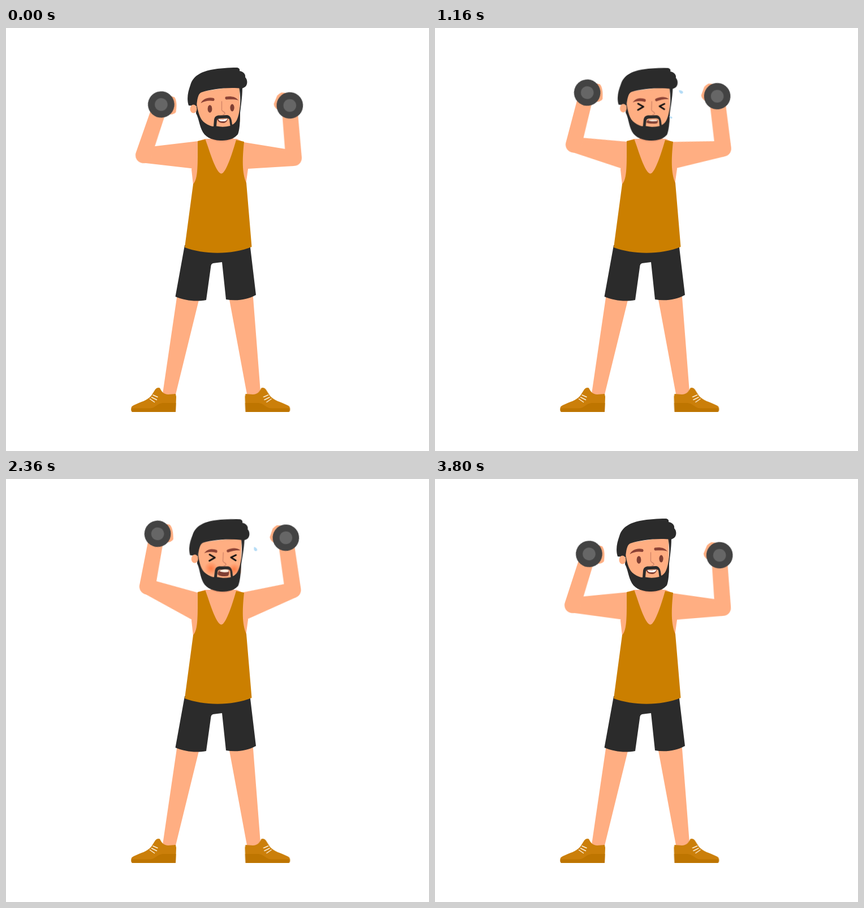
An HTML page for the animation above (3.84 s loop, 748 px wide and 748 px high).

```html
<!DOCTYPE html>
<html lang="en">
<head>
<meta charset="utf-8">
<title>Dumbbell press</title>
<style>
html, body { margin: 0; width: 100%; height: 100%; overflow: hidden; background: #fff; }
svg { display: block; width: 100vw; height: 100vh; }
.skin { fill: #ffae82; }
.dark { fill: #2b2b2b; }
.shirt { fill: #cb7f00; }
.shoe { fill: #cb7f0a; }
.sole { fill: #be7500; }
.brown { fill: #7f3f33; }
.brow { fill: #8b4235; }
.drop { fill: #b5dcf6; }
.line { fill: none; stroke-linecap: round; stroke-linejoin: round; }
.squint { stroke: #111; stroke-width: 2.9; }
.nose { stroke: #cf8266; stroke-width: 1.3; }
.lace { stroke: #fff3e0; stroke-width: 1.5; }

.a { animation: 3840ms linear infinite; }
.upper-l { animation-name: upper-l; }
.fore-l { animation-name: fore-l; }
.hand-l { animation-name: hand-l; }
.upper-r { animation-name: upper-r; }
.fore-r { animation-name: fore-r; }
.hand-r { animation-name: hand-r; }
.head { animation-name: head; }
.calm { animation-name: calm; }
.effort { animation-name: effort; }
.mouth { animation-name: mouth; }
.blush { animation-name: blush; }
.d1 { animation-name: d1; }
.d2 { animation-name: d2; }
.d3 { animation-name: d3; }
.d4 { animation-name: d4; }

/* slow press, quick push, hold, drop */
@keyframes upper-l {
  0% { transform: rotate(0deg); }
  19.79% { transform: rotate(6.8deg); }
  30.21% { transform: rotate(11.8deg); }
  45.83% { transform: rotate(18deg); }
  62% { transform: rotate(22.4deg); animation-timing-function: ease-in-out; }
  74.5%, 89.58% { transform: rotate(35.2deg); animation-timing-function: cubic-bezier(.42, 0, .71, 1); }
  100% { transform: rotate(0deg); }
}
@keyframes fore-l {
  0% { transform: rotate(19.3deg); }
  19.79% { transform: rotate(9.5deg); }
  30.21% { transform: rotate(3deg); }
  45.83% { transform: rotate(-4.4deg); }
  62% { transform: rotate(-11.4deg); animation-timing-function: ease-in-out; }
  74.5%, 89.58% { transform: rotate(-42deg); animation-timing-function: cubic-bezier(.42, 0, .74, 1); }
  100% { transform: rotate(19.3deg); }
}
@keyframes hand-l {
  0%, 62% { transform: translateY(0); animation-timing-function: ease-in-out; }
  74.5%, 89.58% { transform: translateY(-6.6px); animation-timing-function: ease-in-out; }
  100% { transform: translateY(0); }
}
@keyframes upper-r {
  0% { transform: rotate(0deg); }
  19.79% { transform: rotate(-5.3deg); }
  30.21% { transform: rotate(-10.2deg); }
  45.83% { transform: rotate(-17.2deg); }
  62% { transform: rotate(-20.8deg); animation-timing-function: ease-in-out; }
  74.5%, 89.58% { transform: rotate(-35deg); animation-timing-function: cubic-bezier(.42, 0, .71, 1); }
  100% { transform: rotate(0deg); }
}
@keyframes fore-r {
  0% { transform: rotate(-4.4deg); }
  19.79% { transform: rotate(-.1deg); }
  30.21% { transform: rotate(3.6deg); }
  45.83% { transform: rotate(8.8deg); }
  62% { transform: rotate(13deg); animation-timing-function: ease-in-out; }
  74.5%, 89.58% { transform: rotate(41.9deg); animation-timing-function: cubic-bezier(.42, 0, .74, 1); }
  100% { transform: rotate(-4.4deg); }
}
@keyframes hand-r {
  0%, 62% { transform: translateY(0); animation-timing-function: ease-in-out; }
  74.5%, 89.58% { transform: translateY(-2.5px); animation-timing-function: ease-in-out; }
  100% { transform: translateY(0); }
}
@keyframes head {
  0%, 7% { transform: rotate(0deg); }
  11%, 19.79% { transform: rotate(1.2deg); }
  30.21% { transform: rotate(1.5deg); }
  45.83% { transform: rotate(2.7deg); }
  61.46%, 72% { transform: rotate(2.3deg); }
  74%, 100% { transform: rotate(0deg); }
}
@keyframes calm {
  0%, 10.41% { opacity: 1; }
  10.42%, 73.95% { opacity: 0; }
  73.96%, 100% { opacity: 1; }
}
@keyframes effort {
  0%, 10.41% { opacity: 0; }
  10.42%, 73.95% { opacity: 1; }
  73.96%, 100% { opacity: 0; }
}
@keyframes mouth {
  0%, 20% { transform: scaleY(.12); }
  30.21% { transform: scaleY(.6); }
  42%, 100% { transform: scaleY(1); }
}
@keyframes blush {
  0%, 31% { opacity: 0; }
  44%, 73.95% { opacity: 1; }
  73.96%, 100% { opacity: 0; }
}
@keyframes d1 {
  0%, 27% { transform: translate(427px, 109px) scale(.3); opacity: 0; }
  28% { opacity: 1; }
  30.21% { transform: translate(435px, 113px); opacity: 1; }
  36%, 100% { transform: translate(450px, 124px); opacity: 0; }
}
@keyframes d2 {
  0%, 28.5% { transform: translate(413px, 156px) scale(.3); opacity: 0; }
  30.21% { transform: translate(417px, 158px) scale(.7); opacity: 1; }
  37%, 100% { transform: translate(433px, 167px); opacity: 0; }
}
@keyframes d3 {
  0%, 44.8% { transform: translate(344px, 107px) scale(.3); opacity: 0; }
  45.83% { transform: translate(341px, 106px) scale(.7); opacity: .65; }
  48% { opacity: 1; }
  53%, 100% { transform: translate(314px, 98px); opacity: 0; }
}
@keyframes d4 {
  0%, 57.5% { transform: translate(425px, 113px) scale(.3); opacity: 0; }
  59% { opacity: 1; }
  61.46% { transform: translate(441px, 124px) rotate(25deg); opacity: 1; }
  67%, 100% { transform: translate(455px, 138px) rotate(30deg); opacity: 0; }
}
</style>
</head>
<body>
<svg viewBox="0 0 748 748">
  <defs>
    <radialGradient id="glow">
      <stop offset="0" stop-color="#ff6a30" stop-opacity=".75"/>
      <stop offset="1" stop-color="#ff6a30" stop-opacity="0"/>
    </radialGradient>
    <g id="weight">
      <circle r="23.4" fill="#434343"/>
      <circle r="11.3" fill="#666"/>
    </g>
    <g id="shoe">
      <path class="shoe" d="M221.500 673Q221 669 226 667C238 661 250 659 257 650L264 639Q267 635 272 636.500C275 643 279 648 287 648L300 647L301 652L300 679H224Q221 679 221.500 673Z"/>
      <path class="sole" d="M221.500 672.500H255C264 672 267 664 277 663H300.500L300 679H224Q221 679 221.500 672.500Z"/>
      <path class="line lace" d="M260 649L268 652.500M257.500 653L266.500 657.500M254.500 656L262.500 661.500"/>
    </g>
    <path id="drop" class="drop" d="M-4 -2.500C-1 -3.500 4 -2 3.600 1C3 4 -1.500 3.500 -2.500 1Z"/>
  </defs>

  <!-- arms -->
  <g transform="translate(335 225)">
    <g class="a upper-l">
      <path class="skin" d="M5 -25L-92 -13.500L-94 13.300L13 25.500Z"/>
      <g transform="translate(-92 0)">
        <g class="a fore-l">
          <circle class="skin" r="14"/>
          <path class="skin" d="M-14 0L-14 -92H12.300L14.300 0Z"/>
          <g class="a hand-l">
            <g transform="translate(0 -95)">
              <path class="skin" d="M6 -20L18 -20C24 -16 27 -6 29 4Q28 8 22 11L8 14Z"/>
              <use href="#weight"/>
            </g>
          </g>
        </g>
      </g>
    </g>
  </g>
  <g transform="translate(416 217)">
    <g class="a upper-r">
      <path class="skin" d="M-6 -16.800L92 -.7L93 27L-6 33Z"/>
      <g transform="translate(93 13)">
        <g class="a fore-r">
          <circle class="skin" r="14"/>
          <path class="skin" d="M-14.500 0V-92H13L14 0Z"/>
          <g class="a hand-r">
            <g transform="translate(0 -93.300)">
              <path class="skin" d="M-6 -23L-13 -24Q-18 -22 -21 -19L-28 -5Q-28 1 -23 5L-8 8Z"/>
              <use href="#weight"/>
            </g>
          </g>
        </g>
      </g>
    </g>
  </g>

  <!-- body -->
  <path class="skin" d="M339 200L352 196H408L421 202L428 249L424 278H331L328 250Z"/>
  <path fill="#f7a279" d="M361 195C370 204 393 204 403 195Z"/>
  <path class="skin" d="M303 470L276.500 650H299.500L342.500 475ZM394 475L426.500 650H450.500L436.500 470Z"/>
  <path class="dark" d="M316 384L299.500 475C316 482 336 484.500 354 481L362.500 420Q363 417 366 416L382 414L389 480C407 483 426 481 442 472L431.500 384Z"/>
  <path class="shirt" d="M339 200L352.500 197C359 214 371 257 381 257.500C389 257 401 219 407 198L421 201C418 230 417 256 425 274L434.500 387C400 401 350 401 316 388L331 276C340 267 339 240 339 200Z"/>
  <use href="#shoe"/>
  <use href="#shoe" transform="matrix(-1 0 0 1 723.500 0)"/>

  <!-- head -->
  <g transform="translate(380 198)">
    <g class="a head">
      <g transform="translate(-380 -198)">
        <path class="skin" d="M337 114L413 102L414 165L400 186H355L337 152Z"/>
        <g class="a blush" fill="url(#glow)">
          <circle cx="361" cy="159" r="12"/>
          <circle cx="402" cy="159" r="11"/>
        </g>
        <path class="dark" fill-rule="evenodd" d="M412 104L418 106C418 122 415 140 414 150C414 166 413 181 410 188C402 198 388 199 379 199C362 198 351 192 346 180C341 168 341 160 336 151L337 134C340 150 343 162 352 168C358 172 363 174 367 174L368 162C369 156 373 154 379 154.500L391 154C397 155 399 160 400 171C407 168 410 160 412 150C415 135 415 120 412 104ZM372 173.500L373 163Q374 160 380 160L390 159.500Q394 159.500 395 162L396.500 173Q384 176 372 173.500Z"/>
        <path class="dark" d="M323 137C319 125 322 112 326 101C331 84 345 78 362 74C378 71 395 70 407 70C412 70 414 73 413 76C420 77 424 82 423 87C428 92 427 101 423 104Q420 106 417 107C395 104 362 108 345 114C339 117 338 128 337 138Z"/>
        <ellipse class="skin" cx="331.500" cy="143" rx="6" ry="7.500"/>
        <path class="line nose" d="M381.500 130V145C382 148 388 148 387 151.500Q386 153.500 383.500 153.500"/>

        <g class="a calm">
          <ellipse class="brown" cx="360.500" cy="143" rx="3.900" ry="6.800"/>
          <ellipse class="brown" cx="400" cy="141" rx="3.600" ry="6.500"/>
          <path class="brow" d="M344.500 133C348 125 358 121.500 367.500 124Q370 127 367 129C359 127.500 351 129 344.500 133ZM388.500 121.500C397 120 406 121 411 128C404 125.500 396 126.500 389 126.500Q386 124 388.500 121.500Z"/>
          <path class="brown" d="M373 160.500C380 162 386 161 392.500 159.500C392 165 388 168.500 383 168C378 168 374 165 373 160.500Z"/>
          <path fill="#fff" d="M375.500 161C382 162 386 161.500 391.500 160C391 164 387 165.500 383 165C378.500 165 376.500 164 375.500 161Z"/>
        </g>

        <g class="a effort">
          <path class="line squint" d="M357.500 134.500L367 139.500L357.500 145.500M404 133.500L395.500 138L404 143"/>
          <path class="brow" d="M348 132.500C352 125 361 123 370 126Q372 129 369.500 131C362 129 354 129.500 348 132.500ZM388 125C396 121 405 120 411.500 125C404 124.500 396 126.500 389.500 129.500Q386 127.500 388 125Z"/>
          <g transform="translate(383 165)">
            <g class="a mouth">
              <path class="brown" d="M-10 3C-9 -3 -6 -5 0 -5L9 -5C11 0 10 5 8 6C2 8 -9 7 -10 3Z"/>
              <path fill="#fff0e2" d="M-7 -2C-4 -5 3 -6 9 -4.500Q10 -2 8 -1C3 0 -3 0 -7 -2Z"/>
            </g>
          </g>
        </g>
      </g>
    </g>
  </g>

  <use class="a d1" href="#drop"/>
  <use class="a d2" href="#drop"/>
  <use class="a d3" href="#drop"/>
  <use class="a d4" href="#drop"/>
</svg>
</body>
</html>
```
